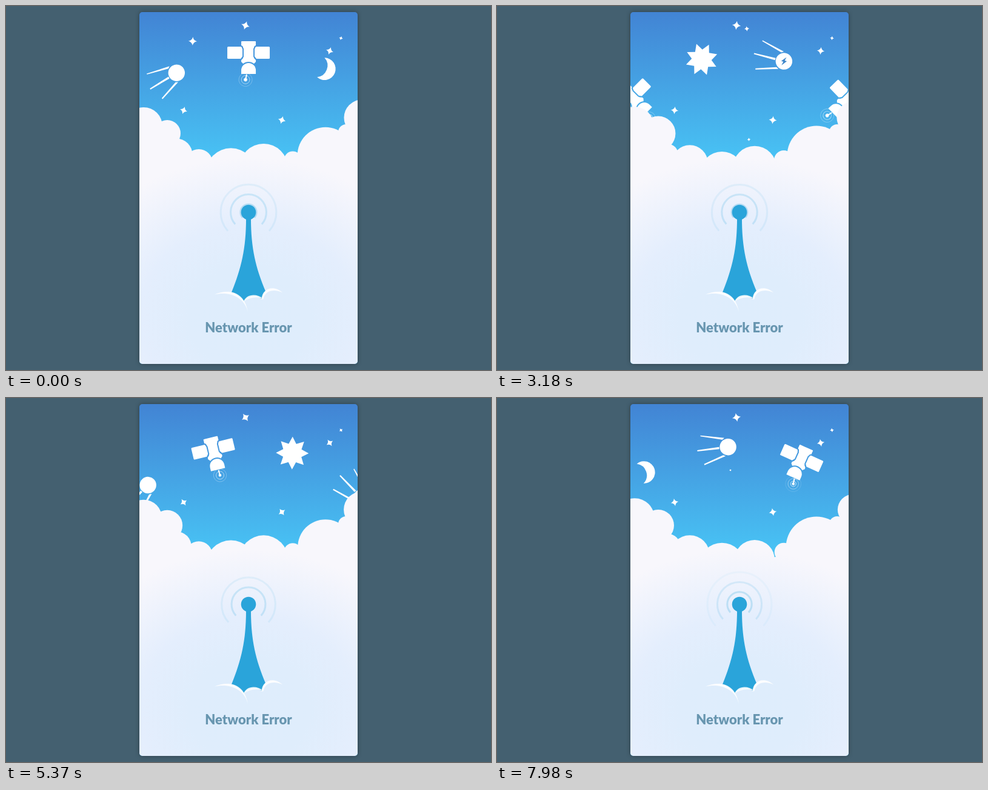
An HTML page that plays this animation: 800x600 px, repeating every 8 s.

```html
<!DOCTYPE html>
<html lang="en">
<head>
<meta charset="utf-8">
<title>Network Error</title>
<style>
  html, body { margin: 0; width: 100%; height: 100%; overflow: hidden; background: #446070; }
  svg { display: block; position: absolute; left: 0; top: 0; }
  .card { position: absolute; left: 220px; top: 10px; width: 360px; height: 580px; border-radius: 5px; box-shadow: 0 0 7px rgba(0, 0, 0, .35); }
  text { font: 900 22px Lato, "Open Sans", sans-serif; fill: #6896b0; }
</style>
</head>
<body>
<div class="card"></div>
<svg width="800" height="600" viewBox="0 0 800 600">
  <defs>
    <clipPath id="frame"><rect x="220" y="10" width="360" height="580" rx="5"/></clipPath>
    <linearGradient id="sky" gradientUnits="userSpaceOnUse" x1="0" y1="10" x2="0" y2="250">
      <stop offset="0" stop-color="#4284d4"/><stop offset="1" stop-color="#48c2f4"/>
    </linearGradient>
    <radialGradient id="mist" gradientUnits="userSpaceOnUse" cx="0" cy="0" r="1" gradientTransform="translate(400 515) scale(330 280)">
      <stop offset="0" stop-color="#deedfc"/><stop offset=".3" stop-color="#dfedfc"/>
      <stop offset=".55" stop-color="#e4eefd"/><stop offset=".95" stop-color="#f8f7fc"/>
    </radialGradient>
    <path id="panel" d="M-33.5 -10H-13Q-11 -10 -11 -8L-10 -6V6L-13 10H-33.5Q-35 10 -35 8.500V-8.500Q-35 -10 -33.500 -10Z"/>
    <path id="dish" d="M-12 35V29A12 12 0 0 1 12 29V35Z"/>
    <mask id="gaps" maskUnits="userSpaceOnUse" x="-40" y="-25" width="80" height="80">
      <rect x="-40" y="-25" width="80" height="80" fill="#fff"/>
      <g stroke="#000" stroke-width="4">
        <use href="#panel"/><use href="#panel" transform="scale(-1 1)"/><use href="#dish"/>
      </g>
    </mask>
    <g id="satellite" fill="#fff">
      <path mask="url(#gaps)" d="M-12 -18Q-12 -19 -11 -19H11Q12 -19 12 -18V-9L9 -6V9L12 12V15L7 20H-7L-12 15V12L-9 9V-6L-12 -9Z"/>
      <use href="#panel"/><use href="#panel" transform="scale(-1 1)"/><use href="#dish"/>
    </g>
    <g id="sputnik" fill="#fff">
      <circle r="13.700"/>
      <path d="M-44 -22.500L-5 -15.300L-8.500 -12.700L-44 -21ZM-51 1.500L-14.700 -1L-14.700 2.500L-51 3.500ZM-41.500 25L-9 12.800L-5 14.800L-41 27Z"/>
    </g>
    <path id="bolt" fill="#3f87c9" d="M2 -7.500L-4.500 1H-.8L-2 7.500L4.500 -1.500H.8Z"/>
    <path id="moon" fill="#fff" d="M-17.100 -6.600A18.300 18.300 0 1 0 17.100 -6.600A19.200 19.200 0 0 1 -17.100 -6.600Z"/>
    <path id="star" fill="#fff" d="M0 -7.200Q1.300 -1.300 7.200 0Q1.300 1.300 0 7.200Q-1.300 1.300 -7.200 0Q-1.300 -1.300 0 -7.200Z"/>
  </defs>
  <g clip-path="url(#frame)">
    <rect x="220" y="10" width="360" height="580" fill="url(#sky)"/>
    <g id="stars"></g>
    <g id="orbit"></g>
    <g id="clouds" fill="url(#mist)">
      <path d="M220 198L266 215L285 245L318 262L371 270L425 267L473 260L527 246L561 208L588 184V600H220Z"/>
    </g>
    <g id="waves" fill="none" stroke="#2aa4da" stroke-width="3"></g>
    <circle cx="400" cy="340" r="12.300" fill="#2aa4da"/>
    <path fill="#2aa4da" d="M396 350C396 400 388 432 372 472Q383 475 392 487Q406 473 423 483Q423 475 428 470C412 432 404 400 404 350Z"/>
    <path fill="#fff" fill-opacity=".9" d="M344 475.500C362 468 392 466 399 504C393 479 368 470 344 475.500ZM391.500 488C396 475 413 473 424 482.500C413 478 399 481 391.500 488ZM421.500 484C422 465 442 459 456 472.500C444 466 427 468 424.500 483Z"/>
    <text x="400" y="538" text-anchor="middle">Network Error</text>
  </g>
</svg>
<script>
const LOOP = 8, QUARTER = 6.25, SPEED = 14.4;
const TAU = Math.PI * 2;
const byId = id => document.getElementById(id);

function add(parent, tag, attrs = {}) {
  const node = document.createElementNS("http://www.w3.org/2000/svg", tag);
  for (const key in attrs) node.setAttribute(key, attrs[key]);
  return parent.appendChild(node);
}
const sprite = (parent, id) => add(parent, "use", { href: "#" + id });
const move = (node, value) => node.setAttribute("transform", value);
const mod = (a, n) => ((a % n) + n) % n;

// Fixed stars: x, y, scale
const fixedStars = [[395, 32, 1], [552.5, 53, .45], [534, 74, .87], [293, 172, .87], [455, 188, .9]]
  .map(([x, y, size]) => ({ x, y, size, node: sprite(byId("stars"), "star") }));

// Twinkling stars: x, y, scale, time of peak
const twinkles = [[308, 58, .98, 0], [262, 161, .9, 1.13], [385, 119, 1, 2.06], [406, 128, .8, 2.21],
  [412, 37.5, .75, 3.35], [415.5, 220, .6, 3.4], [407, 122.5, .75, 4.5], [551.5, 82.5, .75, 4.85]]
  .map(([x, y, size, peak]) => ({ x, y, size, peak, node: sprite(byId("stars"), "star") }));

// Bodies ride a ring around (400, 328); "angle" is where they start on it.
const bodies = [];
function body(kind, angle, radius) {
  const group = add(byId("orbit"), "g");
  const item = { kind, angle, radius, group };
  if (kind === "sun") {
    const points = Array.from({ length: 16 }, (_, i) => {
      const r = i % 2 ? 16.3 : 27, a = i * TAU / 16;
      return `${r * Math.sin(a)},${-r * Math.cos(a)}`;
    });
    item.sun = add(group, "polygon", { points: points.join(" "), fill: "#fff" });
  } else {
    item.shape = sprite(group, kind);
  }
  if (kind === "sputnik") item.bolt = sprite(group, "bolt");
  if (kind === "satellite") {
    item.antenna = add(group, "g", { stroke: "#fff", fill: "none" });
    add(item.antenna, "path", { d: "M0 36V45", "stroke-width": 2 });
    add(item.antenna, "circle", { cy: 45, r: 2.3, fill: "#fff", stroke: "none" });
    item.rings = [0, 1, 2].map(() => add(item.antenna, "circle", { cy: 45, "stroke-width": .9 }));
  }
  bodies.push(item);
  return item;
}
body("moon", 29.2, 257);
body("moon", -152.4, 259);
for (const item of bodies) move(item.shape, `rotate(${item.angle > 0 ? -98.2 : -71.5})`);
body("sun", -60.4, 248);
body("sputnik", -28.6, 248);
body("sputnik", -119.3, 248);
body("satellite", 0, 251);
body("satellite", -90.8, 251);

// Cloud puffs: x, y, then mean radius with cos, sin and double-cos swing
const puffs = [
  [227, 198, 31.5, -.5, 1.2, 0],
  [266, 210, 26, -3.2, -1.35, -.83],
  [281, 245, 22.2, 4.3, 0, 0],
  [318, 259, 27.55, -3.5, 3.7, -1.05],
  [371, 276, 38.8, 2.9, -1, 0],
  [425, 267, 37.2, 2, -3, .83],
  [473, 254, 15.2, -.8, 0, 0],
  [527, 246, 47.9, -1.1, 1.93, -.51],
  [561, 208, 13, 0, 0, 0],
  [587, 184, 27.6, 1.5, -1.84, .42]
].map(([cx, cy, ...swing]) => ({ swing, node: add(byId("clouds"), "circle", { cx, cy }) }));

const waves = [0, 1, 2].map(() => add(byId("waves"), "path"));
const arcX = Math.sin(TAU * 132 / 360), arcY = -Math.cos(TAU * 132 / 360);

function drawStars(t) {
  const spin = 18 - 60 * t;
  for (const s of fixedStars) move(s.node, `translate(${s.x} ${s.y}) rotate(${spin}) scale(${s.size})`);
  for (const s of twinkles) {
    const d = mod(t - s.peak + QUARTER / 2, QUARTER) - QUARTER / 2;
    const size = Math.abs(d) < .4 ? s.size * Math.cos(Math.PI * d / .8) : 0;
    move(s.node, `translate(${s.x} ${s.y}) rotate(${spin - 15}) scale(${size})`);
  }
}

function drawBodies(t, wave) {
  const flash = mod(t, 3) > .05 && mod(t, 3) < .35;
  const swing = 12.5 * Math.cos(TAU * t / 3.125);
  for (const b of bodies) {
    const angle = b.angle + SPEED * t;
    move(b.group, `rotate(${angle} 400 328) translate(400 ${328 - b.radius})`);
    b.group.style.display = Math.abs(angle) < 62 ? "" : "none";
    if (b.sun) move(b.sun, `rotate(${10 + 50 * (t - 4.65) - angle})`);
    if (b.bolt) b.bolt.style.display = flash ? "" : "none";
    if (b.antenna) {
      move(b.antenna, `rotate(${swing} 0 22)`);
      b.rings.forEach((ring, i) => {
        const r = 2.5 + 4.2 * (i + wave);
        ring.setAttribute("r", r);
        ring.setAttribute("opacity", Math.max(0, 1 - r / 15.1));
      });
    }
  }
}

function drawClouds(t) {
  const p = TAU * t / QUARTER;
  for (const { swing: [mean, a, b, c], node } of puffs)
    node.setAttribute("r", mean + a * Math.cos(p) + b * Math.sin(p) + c * Math.cos(2 * p));
}

function drawWaves(wave) {
  waves.forEach((node, i) => {
    const r = 12.4 + 16.4 * (i + wave);
    const y = 340 + r * arcY;
    node.setAttribute("d", `M${400 - r * arcX} ${y}A${r} ${r} 0 1 1 ${400 + r * arcX} ${y}`);
    node.setAttribute("opacity", Math.max(0, .28 * (60 - r) / 47));
  });
}

function draw() {
  const t = (performance.now() / 1000) % LOOP;
  const wave = 1 - mod(t / 1.055 + .96, 1);
  drawStars(t);
  drawBodies(t, wave);
  drawClouds(t);
  drawWaves(wave);
  requestAnimationFrame(draw);
}
draw();
</script>
</body>
</html>
```
